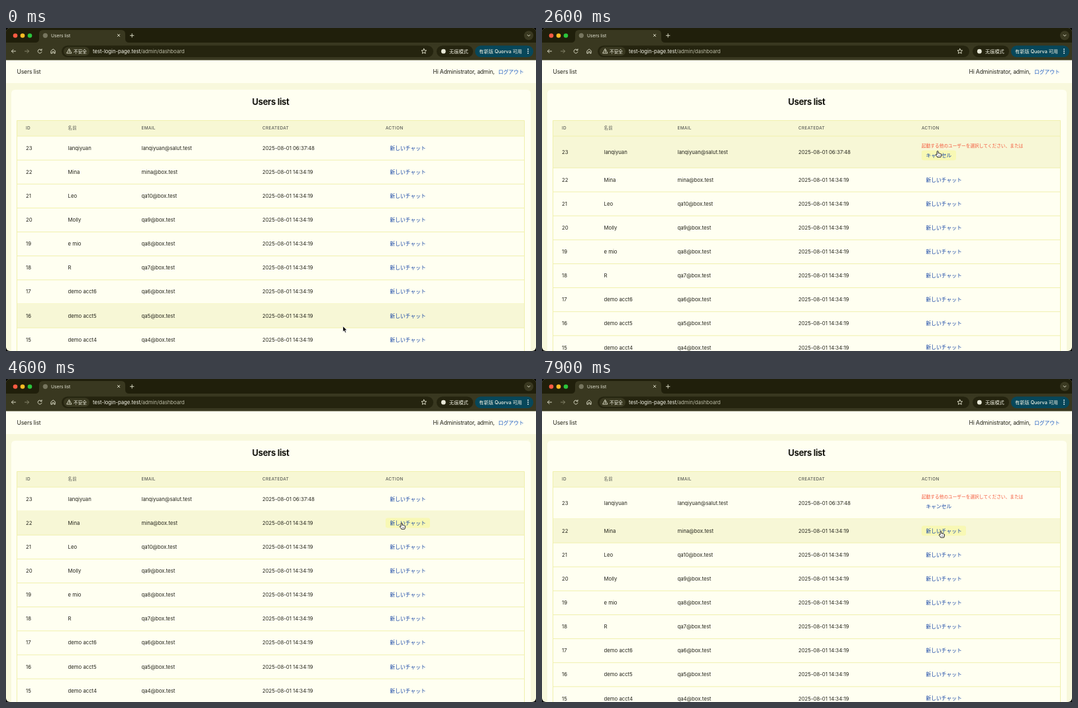
Animation, 800 px wide and 487 px high, one loop 8 s. Source, as an HTML page:

```html
<!DOCTYPE html>
<html lang="ja">
<head>
<meta charset="utf-8">
<title>Users list</title>
<style>
  html, body { margin: 0; width: 100%; height: 100%; overflow: hidden; background: #000; }
  svg { display: block; width: 100vw; height: 100vh; }
  text { font-family: Inter, "Noto Sans CJK JP", "Noto Sans CJK", sans-serif; font-size: 7.75px; fill: #24241c; white-space: pre; }
  .zh { font-family: Inter, "Noto Sans CJK SC", "Noto Sans CJK", sans-serif; font-size: 7.2px; font-weight: 500; fill: #f4f4e6; }
  .top { font-size: 8.6px; letter-spacing: -.02em; }
  .title { font-size: 13px; font-weight: 700; letter-spacing: -.025em; text-anchor: middle; fill: #15150f; }
  .th { font-size: 6.4px; font-weight: 500; letter-spacing: .05em; fill: #5b5d58; }
  .link { font-weight: 500; fill: #1645a5; }
  .out { fill: #2360c4; }
  .warn { font-size: 6.7px; fill: #f4583c; }
  .url { font-size: 7.7px; fill: #f6f6ea; }
  .icon { fill: none; stroke: #d6d6c0; stroke-width: 1; stroke-linecap: round; stroke-linejoin: round; }
  .dim { stroke: #85846a; }
  .rule { stroke: #f0f0ae; stroke-width: 1; }
</style>
</head>
<body>
<svg viewBox="0 0 800 487" preserveAspectRatio="none">
  <defs><clipPath id="window"><rect width="800" height="487" rx="6"/></clipPath></defs>
  <g clip-path="url(#window)">
    <rect width="800" height="487" fill="#f8f8dc"/>

    <!-- tab strip and toolbar -->
    <rect width="800" height="49" fill="#393820"/>
    <path d="M0 0H800V22H186Q180 22 180 16V9Q180 3 174 3H56Q50 3 50 9V16Q50 22 44 22H0Z" fill="#201f0b"/>
    <circle cx="14" cy="11.5" r="3.3" fill="#ff5b43"/>
    <circle cx="25" cy="11.5" r="3.3" fill="#ffbc24"/>
    <circle cx="36" cy="11.5" r="3.3" fill="#2bc63c"/>
    <circle cx="59.3" cy="11.3" r="3.6" fill="#77765f"/>
    <text x="68" y="13.5" style="font-size:6.7px;fill:#e8e8d8">Users list</text>
    <path class="icon" d="M168.4 9.4l3.4 3.4M171.8 9.4l-3.4 3.4M187.5 11.3h5.4M190.2 8.6v5.4"/>
    <circle cx="789" cy="11.3" r="7" fill="#3a3921"/>
    <path class="icon" d="M787 10.3l2 2 2-2"/>
    <path class="icon" d="M14.5 35H8.5M11 32.4L8.4 35l2.6 2.6"/>
    <path class="icon dim" d="M28.5 35h6M32 32.4l2.6 2.6-2.6 2.6"/>
    <path class="icon" d="M53.6 33.3A3 3 0 1 0 54 36M54 31.7V33.7H52"/>
    <path class="icon" d="M68.2 34.3L71.2 31.8L74.2 34.3V38.2H72.4V35.8H70V38.2H68.2Z"/>
    <rect x="84" y="26.5" width="561" height="17.5" rx="8.75" fill="#25240f"/>
    <rect x="87" y="28.5" width="39" height="13.5" rx="6.75" fill="#393820"/>
    <path class="icon" d="M95.5 31.6L99 38H92ZM95.5 34v1.6M95.5 36.7v.1"/>
    <text class="zh" x="102" y="37.6" style="font-size:6.7px">不安全</text>
    <text class="url" x="131" y="37.8">test-login-page.test<tspan fill="#bebea8">/admin/dashboard</tspan></text>
    <path class="icon" d="M630.8 31.2l1.1 2.5 2.7.2-2 1.8.6 2.7-2.4-1.4-2.4 1.4.6-2.7-2-1.8 2.7-.2Z"/>
    <rect x="650" y="26.5" width="55" height="17.5" rx="8.75" fill="#25240f"/>
    <circle cx="660.3" cy="35.2" r="3.4" fill="#e8e8d8"/>
    <text class="zh" x="669" y="37.8">无痕模式</text>
    <rect x="708" y="26.5" width="88" height="17.5" rx="8.75" fill="#07475a"/>
    <text class="zh" x="714" y="37.8">有新版 Quorva 可用</text>
    <g fill="#e8f2f2"><circle cx="788" cy="32" r=".9"/><circle cx="788" cy="35" r=".9"/><circle cx="788" cy="38" r=".9"/></g>

    <!-- page -->
    <rect y="48.5" width="800" height="34.5" fill="#fffff1"/>
    <text class="top" x="16.5" y="69">Users list</text>
    <text class="top" x="644.5" y="69">Hi Administrator, admin,</text>
    <text class="out" x="743" y="69">ログアウト</text>
    <path d="M8 487V99Q8 93 14 93H786Q792 93 792 99V487Z" fill="#fffff1"/>
    <text class="title" x="399.5" y="116">Users list</text>
    <rect x="16.5" y="139.5" width="766" height="23.5" fill="#f7f7d4"/>
    <g id="heads"></g>
    <g id="rows"></g>
    <path d="M16.5 487V139.5H782.5V487M16.5 163H782.5" fill="none" class="rule"/>
  </g>
  <g id="arrow">
    <path d="M0 0V8.6L2 6.8L3.4 9.9L5 9.2L3.6 6.2H6.3Z" fill="#080808" stroke="#fff" stroke-width=".7"/>
  </g>
  <g id="hand">
    <path d="M-1 1Q-1 0 0 0T1 1V3.4Q2 2.8 2.7 3.7Q3.7 3.2 4.3 4.1Q5.6 3.8 5.6 5.2Q5.7 7.5 4.6 9.3H-.3Q-1.2 7.4-2.8 5.7Q-2.8 4.2-1 5.3Z" fill="#fff" stroke="#0c0c0c" stroke-width=".9" stroke-linejoin="round"/>
    <path d="M1 6v1.7M2.4 6v1.7M3.8 6v1.7" stroke="#222" stroke-width=".45"/>
  </g>
</svg>
<script>
const LOOP = 8000, STEP = 100, FADE = 150;
const TOP = 163, ROW = 36.13, GROW = 11.8;
const NS = "http://www.w3.org/2000/svg";
const $ = id => document.getElementById(id);

const users = [
  ["lanqiyuan", "lanqiyuan@salut.test"],
  ["Mina", "mina@box.test"],
  ["Leo", "qa10@box.test"],
  ["Molly", "qa9@box.test"],
  ["e mio", "qa8@box.test"],
  ["R", "qa7@box.test"],
  ["demo acct6", "qa6@box.test"],
  ["demo acct5", "qa5@box.test"],
  ["demo acct4", "qa4@box.test"]
];

// Pointer stops: time, x, y
const path = [
  [0, 508.5, 449.5], [200, 508.5, 449.5], [1100, 597, 185], [2600, 597.2, 185.5],
  [3800, 596, 186], [4000, 596, 209], [4400, 597, 217], [5200, 598, 217],
  [5500, 599, 229], [5900, 598, 185], [6300, 599, 181], [6600, 600, 183],
  [7100, 601, 200], [7500, 602, 229.7], [8000, 602, 229.7]
];

const isOpen = t => (t >= 1900 && t < 3300) || t >= 6100;

function add(parent, tag, attrs, text) {
  const el = document.createElementNS(NS, tag);
  for (const k in attrs) el.setAttribute(k, attrs[k]);
  if (text) el.textContent = text;
  parent.appendChild(el);
  return el;
}

[[30, "ID"], [93.5, "名前"], [204.5, "EMAIL"], [387, "CREATEDAT"], [573, "ACTION"]]
  .forEach(([x, s]) => add($("heads"), "text", { x, y: 153.2, class: "th" }, s));

const rows = users.map(([name, mail], i) => {
  const g = add($("rows"), "g", {});
  const shade = add(g, "rect", { x: 16.5, width: 766, fill: "#f7f7d6" });
  const cells = add(g, "g", {});
  const date = "2025-08-01 " + (i ? "14:34:19" : "06:37:48");
  [[30, 23 - i], [93.5, name], [204.5, mail], [387, date]]
    .forEach(([x, s]) => add(cells, "text", { x, y: 2.8 }, s));
  const button = add(g, "rect", { x: 573, height: 15, rx: 3, fill: "#f8f8b4" });
  const warn = i ? null : add(g, "text", { x: 573, y: 17.2, class: "warn" }, "起動する他のユーザーを選択してください、または");
  const label = add(g, "text", { x: 579.5, class: "link" }, "新しいチャット");
  const line = add(g, "line", { x1: 16.5, x2: 782.5, class: "rule" });
  return { g, shade, cells, button, warn, label, line };
});

function pointer(t) {
  let i = 1;
  while (i < path.length - 1 && t > path[i][0]) i++;
  const a = path[i - 1], b = path[i];
  const u = Math.max(0, Math.min(1, (t - a[0]) / (b[0] - a[0])));
  const e = u * u * (3 - 2 * u);
  return [a[1] + (b[1] - a[1]) * e, a[2] + (b[2] - a[2]) * e];
}

function rowBox(i, open) {
  const extra = open ? GROW : 0;
  const wide = open && i === 0;
  return {
    y: TOP + i * ROW + (i ? extra : 0),
    h: ROW + (wide ? extra : 0),
    buttonY: wide ? 21.6 : 10.3,
    buttonW: wide ? 52 : 67
  };
}

function hover(t) {
  const [x, y] = pointer(t), open = isOpen(t);
  for (let i = 0; i < rows.length; i++) {
    const r = rowBox(i, open);
    if (y < r.y || y >= r.y + r.h) continue;
    const dy = y - r.y - r.buttonY;
    return { row: i, button: x >= 573 && x < 573 + r.buttonW && dy >= 0 && dy < 15 };
  }
  return { row: -1, button: false };
}

function draw(t) {
  const open = isOpen(t), [x, y] = pointer(t), now = hover(t);
  const past = Array.from({ length: 10 }, (_, k) => hover(Math.max(0, t - k * FADE / 10)));
  const share = test => past.filter(test).length / past.length;

  rows.forEach((r, i) => {
    const b = rowBox(i, open), wide = open && i === 0;
    r.g.setAttribute("transform", `translate(0 ${b.y})`);
    r.shade.setAttribute("height", b.h);
    r.shade.setAttribute("opacity", share(p => p.row === i));
    r.cells.setAttribute("transform", `translate(0 ${b.h / 2 - .2})`);
    r.button.setAttribute("y", b.buttonY);
    r.button.setAttribute("width", b.buttonW);
    r.button.setAttribute("opacity", share(p => p.row === i && p.button));
    r.label.setAttribute("y", b.buttonY + 10.3);
    r.label.textContent = wide ? "キャンセル" : "新しいチャット";
    r.line.setAttribute("y1", b.h);
    r.line.setAttribute("y2", b.h);
    if (r.warn) r.warn.setAttribute("visibility", wide ? "visible" : "hidden");
  });

  for (const id of ["arrow", "hand"]) {
    $(id).setAttribute("transform", `translate(${x} ${y})`);
    $(id).setAttribute("visibility", (id === "hand") === now.button ? "visible" : "hidden");
  }
}

const start = performance.now();
function tick() {
  const t = (performance.now() - start) % LOOP;
  draw(Math.floor(t / STEP) * STEP);
  requestAnimationFrame(tick);
}
tick();
</script>
</body>
</html>
```
